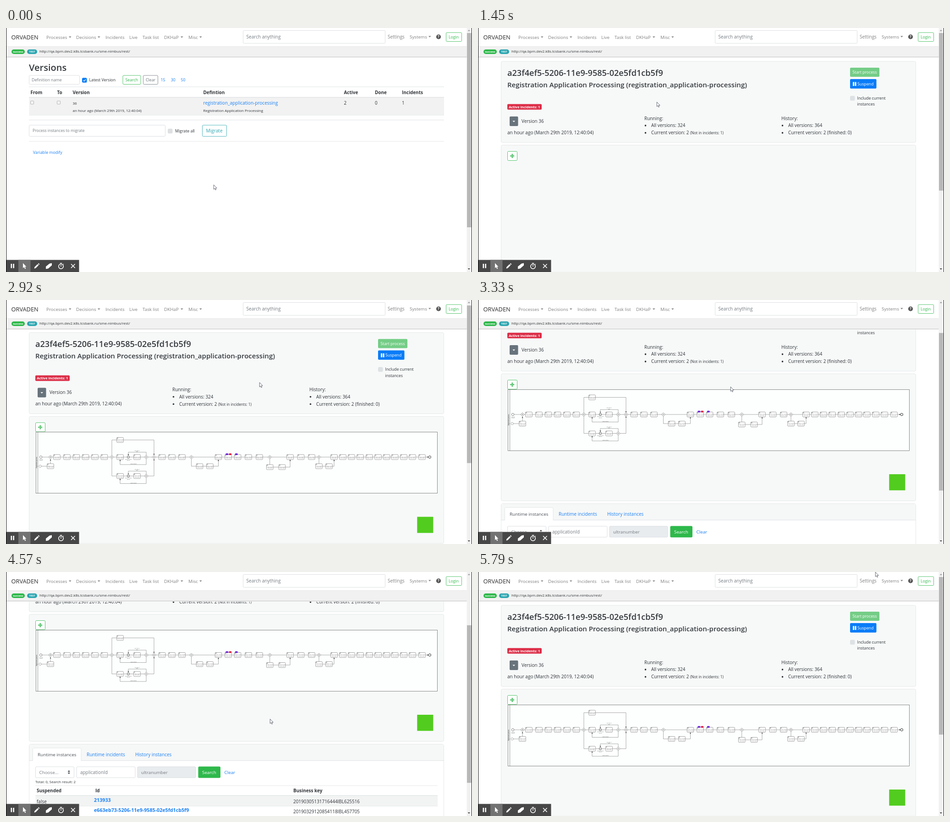
An HTML page that plays this animation: 1017 by 535 pixels, repeating every 6880 ms.

```html
<!DOCTYPE html>
<html lang="en">
<head>
<meta charset="utf-8">
<title>Process versions</title>
<style>
  html, body { margin: 0; width: 100%; height: 100%; overflow: hidden; background: #fff; }
  svg { display: block; width: 100vw; height: 100vh; font-family: "Open Sans", "Noto Sans", sans-serif; }
</style>
</head>
<body>
<svg id="stage" viewBox="0 0 1017 535" preserveAspectRatio="none"></svg>
<script>
const INK = '#2f3337', HEAD = '#363a3e', GRAY = '#808080', LINK = '#1a80f5', GREEN = '#2eb84b', TEAL = '#2aa5b0';
const BASE = 9.95, SMALL = 8.75, TINY = 8;
const LOOP = 6880;

// ---- drawing helpers, all returning SVG markup ----
const text = (x, y, size, str, fill = INK, weight = 400, extra = '') =>
  `<text x="${x}" y="${y}" font-size="${size}" fill="${fill}" font-weight="${weight}" ${extra}>${str}</text>`;
const box = (x, y, w, h, fill, stroke = 'none', r = 0, sw = .8) =>
  `<rect x="${x}" y="${y}" width="${w}" height="${h}" rx="${r}" fill="${fill}" stroke="${stroke}" stroke-width="${sw}"/>`;
const path = (d, stroke, sw = 1, fill = 'none', extra = '') =>
  `<path d="${d}" stroke="${stroke}" stroke-width="${sw}" fill="${fill}" ${extra}/>`;
const circle = (x, y, r, fill, stroke = 'none', sw = 1) =>
  `<circle cx="${x}" cy="${y}" r="${r}" fill="${fill}" stroke="${stroke}" stroke-width="${sw}"/>`;
const rule = (x1, x2, y, color = '#dee2e6') => path(`M${x1} ${y}H${x2}`, color);
const caret = (x, y, fill = GRAY) => path(`M${x} ${y}h5.6l-2.8 3z`, 'none', 0, fill);
const input = (x, y, w, h, label, size, fill = '#fff', dx = 7.5) =>
  box(x + .5, y + .5, w - 1, h - 1, fill, '#d3d7db', 2) +
  text(x + dx, y + h / 2 + size * .36, size, label, '#747b81');
const button = (x, y, w, h, label, size, color, dx = 6) =>
  box(x + .5, y + .5, w - 1, h - 1, '#fff', color, 2) +
  text(x + dx, y + h / 2 + size * .36, size, label, color);
const group = (id, body) => `<g id="${id}">${body}</g>`;

// ---- fixed chrome ----
function navbar() {
  const items = [[88, 'Processes', 137], [153, 'Decisions', 200], [217, 'Incidents'], [269, 'Live'],
    [298, 'Task list'], [345, 'DKHaP', 381], [398, 'Misc', 422], [881, 'Systems', 922, -1]];
  return box(0, 0, 1006, 41, '#fff') + box(0, 40, 1006, 23, '#f1f1f1') +
    rule(0, 1006, 40.5, '#e9e9e9') + rule(0, 1006, 63.5, '#c8c8c8') + rule(0, 1006, 64.5, '#efefef') +
    text(11.5, 25, 12.8, 'ORVADEN', '#2a2a2a') +
    items.map(([x, label, cx, dy = 0]) =>
      text(x, 23.8 + dy, 9.85, label, GRAY) + (cx ? caret(cx, 18.5 + dy) : '')).join('') +
    input(517, 5, 311, 29, 'Search anything', 10.05) +
    text(833, 22.8, BASE, 'Settings', GRAY, 400, 'id="settings"') +
    circle(944, 19.3, 5.1, '#555') +
    text(944, 22.2, 8, '?', '#fff', 700, 'text-anchor="middle"') +
    button(960, 9.5, 35, 20.5, 'Login', SMALL, GREEN) +
    box(12, 47, 29, 10, GREEN, 'none', 5) + text(15.2, 53.9, 5.9, 'success', '#fff', 700) +
    box(46, 47, 22, 10, TEAL, 'none', 5) + text(50.6, 54, 5.7, 'TEST', '#fff', 700) +
    text(73, 54.3, TINY, 'http://qa.bpm.dev2.k8s.tcsbank.ru/sme-nimbus/rest/');
}

function scrollbar() {
  return box(1005.5, 0, 11, 535, '#f1f1f1') + `<rect id="thumb" x="1006" width="9.5" fill="#b8b8b8"/>` +
    path('M1007.8 6.8h5l-2.5-3z', 'none', 0, '#9a9a9a') + path('M1007.8 527h5l-2.5 3z', 'none', 0, '#444') +
    box(0, 0, 1, 535, '#111') + box(1016, 0, 1, 535, '#222');
}

function toolbar() {
  return box(1, 508.5, 158.5, 27, '#474747') + box(27, 508.5, 26.5, 27, '#727272') +
    path('M11.8 517v9.5M16.6 517v9.5', '#fff', 2.6) +
    path('M37 515.5v11l2.5-2.2l2 4l1.8-.9l-2-3.8h3.2z', 'none', 0, '#fff') +
    path('M61.5 527.5l1-3.4l6.4-6.4l2.4 2.4l-6.4 6.4zM69.8 516.8l1.2-1.2l2.4 2.4l-1.2 1.2z', 'none', 0, '#fff') +
    path('M87 523l8-6.5l5-1v5l-8 7l-5 .8z', 'none', 0, '#fff') +
    circle(120, 522.7, 5.2, 'none', '#fff', 1.6) + path('M117.8 515.6h4.4M120 519.6v3.6M124.6 517.4l1.2 1.2', '#fff', 1.4) +
    path('M142 517.5l8.6 8.6M150.6 517.5l-8.6 8.6', '#fff', 1.5);
}

// ---- list of versions ----
function versionsPage() {
  const heads = [[53.5, 'From'], [111.5, 'To'], [145.5, 'Version'], [430.5, 'Defintion'],
    [737.5, 'Active'], [805, 'Done'], [864, 'Incidents']];
  const check = (x, y) => box(x, y, 7, 7, '#f4f4f4', '#a5a5a5', 1);
  return text(50, 94.2, 20, 'Versions', HEAD, 600) +
    input(50, 103.5, 111, 20.5, 'Definition name', SMALL, '#fff', 6) +
    box(166, 109.3, 10.5, 10.5, '#0a7cf5', 'none', 2.5) + path('M168.7 114.6l1.9 2l3.4-4', '#fff', 1.3) +
    text(181.5, 117.3, SMALL, 'Latest Version') +
    button(254.5, 103.5, 40, 20.5, 'Search', SMALL, GREEN) +
    button(299, 103.5, 33, 20.5, 'Clear', SMALL, '#6c757d') +
    [[337.5, 15], [359.8, 30], [381.5, 50]].map(([x, n]) => text(x, 117.3, SMALL, n, LINK)).join('') +
    box(50.5, 152, 905.5, 39.5, '#f2f2f2') +
    rule(50, 956, 129) + rule(50, 956, 152, '#d5d9dd') + rule(50, 956, 191, '#e8eaec') +
    heads.map(([x, label]) => text(x, 144.7, BASE, label, INK, 700)).join('') +
    check(53.5, 160) + check(111.5, 160) +
    text(145.5, 167.7, TINY, '36') + text(145.5, 183.8, TINY, 'an hour ago (March 29th 2019, 12:40:04)') +
    text(430.5, 168, 10.03, 'registration_application-processing', LINK, 400, 'id="processLink"') +
    text(430.5, 183.8, TINY, 'Registration Application Processing') +
    [[737.5, 2], [805, 0], [864, 1]].map(([x, n]) => text(x, 168, BASE, n)).join('') +
    rule(50, 956, 201.8) +
    input(50, 212.5, 298, 25.5, 'Process instances to migrate', 8.55, '#fff', 8) +
    box(353, 220.8, 10.5, 10.5, '#dee0e2', 'none', 2.5) + text(369, 229, SMALL, 'Migrate all') +
    button(428, 212.5, 54, 25.5, 'Migrate', 10.15, TEAL, 8.5) +
    rule(50, 956, 248.5, '#e8e8e8') + text(59, 276, SMALL, 'Variable modify', LINK);
}

// ---- process diagram ----
function diagram() {
  const DARK = '#5a5a5a', Y = 346;
  const words = ['Check', 'Status', 'Create', 'Send', 'Request', 'Update', 'Assign', 'Notify'];
  const label = (x, y, str) => text(x, y, 2.2, str, '#222', 400, 'text-anchor="middle"');
  const task = (x, y = Y) => {
    const n = Math.round(x * 7 + y);
    return box(x - 7.3, y - 5.5, 14.6, 11, '#fff', DARK, 1.5, .55) +
      box(x - 6.3, y - 4.6, 2, 1.6, 'none', DARK, 0, .4) +
      label(x, y + .4, words[n % 8] + ' ' + words[(n + 3) % 8].toLowerCase()) +
      label(x, y + 2.9, words[(n + 5) % 8].toLowerCase() + ' data');
  };
  const gateway = (x, y = Y) =>
    path(`M${x} ${y - 4}l4 4l-4 4l-4-4z`, DARK, .6, '#fff') +
    path(`M${x - 1.4} ${y - 1.4}l2.8 2.8m0-2.8l-2.8 2.8`, DARK, .7);
  const wire = d => path(d, '#666', .55, 'none', 'marker-end="url(#arrow)"');
  const subLoop = y =>
    wire(`M306 ${y}v-10.7H267v7`) + wire(`M306 ${y}v16.5H249v-10.5`) +
    task(249, y) + circle(267, y, 2.8, '#fff', DARK, .7) + circle(267, y, 1.7, '#fff', DARK, .5) +
    task(286, y) + gateway(306, y) +
    label(286, y - 13.6, 'Can retry it') + label(286, y - 11.4, 'later') + label(278, y + 15.7, 'Needs repeat') +
    label(267, y + 5.4, 'Wait for some') + label(267, y + 7.7, 'period');
  const detour = (x1, x2, y, xs) =>
    wire(`M${x1} ${Y}V${y}H${x2}V${Y + 6}`) + xs.map(x => task(x, y)).join('');
  const mainTasks = [111, 133, 153.5, 173.5, 194, 214.5, 340.5, 362, 384, 463.5, 485, 505.5, 529, 553,
    620, 643.5, 667, 716, 735, 754, 773, 793, 812, 830.5, 848.5, 868, 887, 908];
  const badge = (x, fill) => box(x, 337.8, 6, 3.8, fill, 'none', 1.5);
  return box(65.3, 291.3, 876, 134, '#fdfefe', '#555', 0, .7) + path('M69.5 291V425.5', '#555', .6) +
    text(0, 0, 2.6, 'Registration process', '#222', 400, 'transform="translate(68.2 370) rotate(-90)"') +
    wire(`M76 ${Y}H921.5`) +
    wire('M231 346V308.5H323V341.5') + wire('M231 346V387.5H323V350.5') +
    wire('M75 366H97V351') + task(97, 366) + task(249, 308.5) +
    subLoop(346) + subLoop(387.5) +
    detour(404.5, 463.5, 366, [422.5, 445]) + detour(575.7, 620, 368, [575.7, 602.5]) +
    detour(683, 716, 366, [683, 705]) +
    mainTasks.map(x => task(x)).join('') +
    [97, 231, 323, 404.5, 575.7, 683].map(x => gateway(x)).join('') +
    circle(76, Y, 2.7, '#fff', DARK, .7) + circle(74.5, 366, 2.6, '#fff', DARK, .5) +
    label(76.5, 351.5, 'Start by') + label(76.5, 353.8, 'request') +
    circle(924.7, Y, 2.7, '#fff', '#222', 1) +
    badge(479.3, '#6c2bd9') + badge(486.3, '#e5203a') + badge(499.8, '#6c2bd9');
}

// ---- one process: header, diagram, instances, footer ----
function processPage() {
  const CARD = '#f7f9f9', LINE = '#dfe3e3';
  const bullet = (x, y, str) => circle(x - 12.5, y - 3.4, 1.8, INK) + text(x, y, 9.9, str);
  const header =
    box(50.5, 73, 905, 178, CARD, LINE, 3) +
    text(64, 104.8, 18.1, 'a23f4ef5-5206-11e9-9585-02e5fd1cb5f9', HEAD, 600) +
    text(64, 130, 15.05, 'Registration Application Processing (registration_application-processing)', HEAD, 600) +
    box(64, 166.8, 75, 12.3, '#dc2f48', 'none', 2) + text(67.3, 175.8, 7.5, 'Active incidents: 1', '#fff', 700) +
    box(69, 194, 18.5, 21, '#68737c', 'none', 2) + caret(75.4, 203.5, '#fff') +
    text(95, 207.8, BASE, 'Version 36') +
    text(64, 233, 10.03, 'an hour ago (March 29th 2019, 12:40:04)') +
    text(363, 201.5, BASE, 'Running:') + bullet(378, 217.3, 'All versions: 324') +
    bullet(378, 233.3, 'Current version: 2 <tspan font-size="8.1">(Not in incidents: 1)</tspan>') +
    text(662, 201.5, BASE, 'History:') + bullet(677, 217.3, 'All versions: 364') +
    bullet(677, 233.3, 'Current version: 2 (finished: 0)') +
    box(812, 87, 64, 20, '#74cd86', 'none', 2) + text(817.3, 100.3, SMALL, 'Start process', '#fff') +
    box(812, 112, 57.5, 20.7, '#0a7cf8', 'none', 2) + path('M819.6 118.5v8.5M824 118.5v8.5', '#fff', 3) +
    text(828, 125.8, SMALL, 'Suspend', '#fff') +
    box(812, 148.7, 10.5, 10.5, '#dfe2e4', 'none', 2.5) +
    text(827.5, 156.6, SMALL, 'Include current') + text(827.5, 170.3, SMALL, 'instances');
  const canvasCard =
    box(50.5, 256.8, 905, 278.5, CARD, LINE, 3) +
    box(64.5, 270.5, 21, 20, '#fff', GREEN, 2) +
    path('M71.5 280.5h6.4M74.7 277.3v6.4', GREEN, 1.4) +
    path('M74.7 275.6l2 2.4h-4zM74.7 285.4l2-2.4h-4zM69.8 280.5l2.4-2v4zM79.6 280.5l-2.4-2v4z', 'none', 0, GREEN) +
    group('diagram', diagram()) + group('mark', box(897.3, 477, 35, 35.3, '#52cc1f'));

  const row = (y, id, key) => text(67, y + 3, BASE, 'false') + text(192, y, 10.7, id, LINK, 700) + text(627, y + 3, BASE, key);
  const instances =
    box(50.5, 541.5, 905, 204, '#fff', LINE, 3) + box(51, 542, 904, 35.5, '#f6f7f7') + rule(50, 956, 577.5) +
    path('M58.5 578V552.5q0-2.5 2.5-2.5h100.5q2.5 0 2.5 2.5V578', LINE, .8, '#fff') +
    text(69, 567.8, 9.85, 'Runtime instances', '#495057') +
    text(176, 567.8, BASE, 'Runtime incidents', LINK) + text(282, 567.8, BASE, 'History instances', LINK) +
    input(64, 590.5, 85, 25, 'Choose...', 9.8, '#fff', 8.5) +
    path('M134.8 602l2.5-3.2l2.5 3.2zM134.8 603.8l2.5 3.2l2.5-3.2z', 'none', 0, '#343a40') +
    input(153.5, 590.5, 129, 25, 'applicationId', BASE, '#fff', 8.5) +
    input(286.5, 590.5, 128, 25, 'ultranumber', 9.8, '#e9ecef', 8.5) +
    box(419.5, 590.5, 48.5, 25, GREEN, 'none', 2.5) + text(428, 606.8, 9.8, 'Search', '#fff') +
    text(476.5, 606.8, 9.8, 'Clear', LINK) +
    text(64, 627.2, TINY, 'Total: 0, Search result: 2') +
    box(64.5, 654, 877.5, 23, '#f2f3f3') + rule(64, 942, 632.5, '#e6e9eb') + rule(64, 942, 654, '#dadee1') + rule(64, 942, 677.3, '#e6e9eb') +
    [[67, 'Suspended'], [195, 'Id'], [627, 'Business key']].map(([x, s]) => text(x, 647, BASE, s, INK, 700)).join('') +
    row(667.5, '213933', '20190305131716444IBL625516') +
    row(689.8, 'e663eb73-5206-11e9-9585-02e5fd1cb5f9', '20190329120854118IBL457705') +
    box(472.5, 711, 60.5, 20, '#fff', '#dee2e6', 2) + path('M488.5 711v20M502.5 711v20M517.5 711v20', '#dee2e6', .8) +
    ['«', '‹', '›', '»'].map((s, i) =>
      text([480.5, 495.5, 510, 525.3][i], 724.3, SMALL, s, i < 3 ? LINK : '#6c757d', 400, 'text-anchor="middle"')).join('');
  const footer = box(0, 745, 1006, 60, '#f5f5f5') + rule(0, 1006, 745.5, '#cfcfcf') +
    [['Version 0.4.1', INK], ['29.03.2019', INK], ['Help', LINK]].map(([s, c], i) =>
      text(502.8, 758.6 + i * 15.9, 7.85, s, c, 400, 'text-anchor="middle"')).join('');
  return header + canvasCard + instances + footer;
}

const stage = document.getElementById('stage');
stage.innerHTML =
  `<defs><marker id="arrow" markerUnits="userSpaceOnUse" markerWidth="4" markerHeight="4" refX="2.6" refY="1.5" orient="auto"><path d="M0 0L3 1.5L0 3z" fill="#444"/></marker></defs>` +
  box(0, 0, 1017, 535, '#fff') +
  group('versions', versionsPage()) + group('process', processPage()) +
  navbar() + scrollbar() + toolbar() +
  group('ring', `<circle id="ringCircle" cx="469.8" cy="163.8" fill="none" stroke="#d9475a" stroke-width="3" opacity=".9"/>`) +
  group('pointer', path('M.3 .3V10.2L2.5 8.2L4 11.6L5.6 10.9L4.1 7.5H7.2Z', '#555a66', .9, '#fff')) +
  group('hand', path('M3 14.5V12.3L.6 8.9Q.2 7.3 1.7 7.4L3.1 8.8V1.4Q4 0 5 1.4V5.8L8.8 6.7Q9.8 7 9.8 8.2V11L8.9 14.5Z', '#444', .9, '#fff'));

const el = {};
for (const id of ['versions', 'process', 'diagram', 'mark', 'thumb', 'settings', 'processLink', 'ring', 'ringCircle', 'pointer', 'hand'])
  el[id] = document.getElementById(id);

const cursorSteps = [ // time, x, y, shape
  [0, 453, 343.5, 'pointer'], [100, 452, 332, 'pointer'], [160, 446, 306, 'pointer'], [300, 412, 249, 'pointer'],
  [440, 376, 196, 'pointer'], [560, 432, 166, 'hand'], [690, 467.5, 163, 'hand'],
  [1320, 467.5, 163, 'pointer'], [1450, 390, 162, 'pointer'], [1580, 250, 160, 'pointer'], [1710, 133, 161, 'pointer'],
  [1860, 175, 168, 'pointer'], [1990, 256, 176, 'pointer'], [2170, 397, 186, 'pointer'], [2310, 472, 187, 'pointer'],
  [2450, 553, 180.5, 'pointer'], [3330, 551, 190, 'pointer'], [3780, 563, 285, 'pointer'], [3920, 576, 322, 'pointer'],
  [5010, 565.5, 145, 'pointer'], [5150, 684.5, 83, 'pointer'], [5290, 0, 0, 'none'],
  [5430, 873, 23, 'hand'], [5630, 870, 9, 'hand'], [5790, 867, 0, 'pointer']];
const scrollSteps = [[0, 0], [2920, 1.6], [3330, 95], [3480, 215], [3630, 259], [4070, 257.5], [4570, 164], [4700, 45], [4830, 0]];
const held = (steps, t) => steps.filter(s => s[0] <= t).pop();
const show = (node, on) => node.setAttribute('display', on ? 'inline' : 'none');

function render(t) {
  const onProcess = t >= 1320;
  const scroll = held(scrollSteps, t)[1];
  show(el.versions, !onProcess);
  show(el.process, onProcess);
  show(el.mark, t >= 1860);
  show(el.diagram, t >= 2170);
  el.process.setAttribute('transform', `translate(0 ${-scroll})`);
  el.thumb.setAttribute('y', 11 + scroll * .645);
  el.thumb.setAttribute('height', onProcess ? 345.5 : 426);

  const linkHover = t >= 560 && !onProcess;
  el.processLink.setAttribute('fill', linkHover ? '#0f5cb5' : LINK);
  el.processLink.setAttribute('text-decoration', linkHover ? 'underline' : 'none');
  el.settings.setAttribute('fill', t >= 5430 && t < 5790 ? '#4d4d4d' : GRAY);

  show(el.ring, t >= 840 && !onProcess);
  el.ringCircle.setAttribute('r', t < 960 ? 17 : 21.2);

  const [, x, y, shape] = held(cursorSteps, t);
  for (const kind of ['pointer', 'hand']) {
    show(el[kind], kind === shape);
    el[kind].setAttribute('transform', `translate(${x} ${y})`);
  }
}

function tick() {
  render(performance.now() % LOOP);
  requestAnimationFrame(tick);
}
tick();
</script>
</body>
</html>
```
